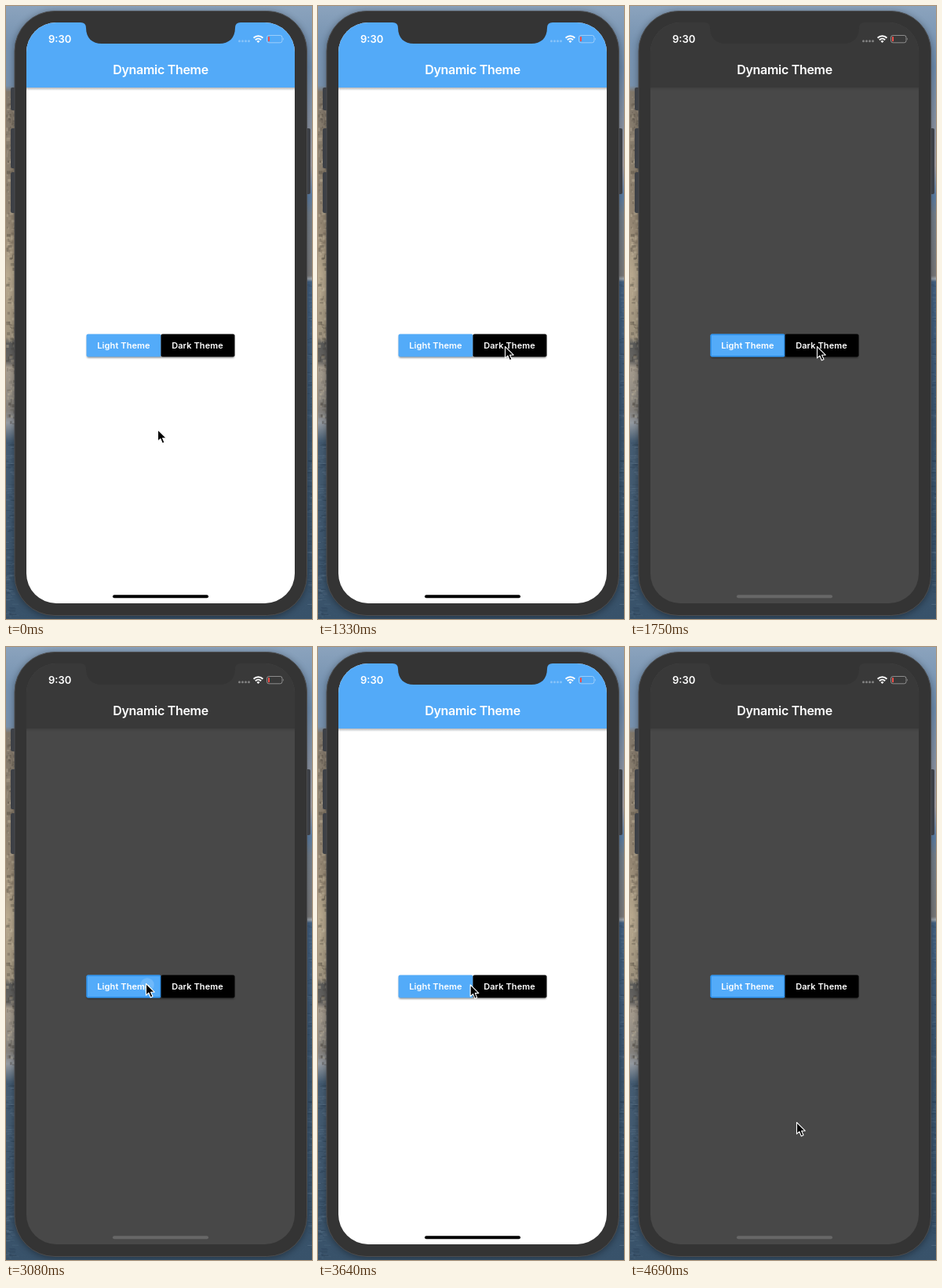
These frames come from a looping animation (390x782 px, 4.76 s). An HTML page:

```html
<!DOCTYPE html>
<html lang="en">
<head>
<meta charset="utf-8">
<title>Dynamic Theme</title>
<style>
  html, body { margin: 0; width: 100%; height: 100%; overflow: hidden; background: #2c4058; }
  svg { display: block; width: 390px; height: 782px; }
  text { font-family: Inter, sans-serif; font-weight: 600; fill: #fff; }
  .label { font-size: 11px; letter-spacing: .1px; text-anchor: middle; }
</style>
</head>
<body>
<svg viewBox="0 0 390 782">
  <defs>
    <linearGradient id="coast" x2="0" y2="1">
      <stop offset="0" stop-color="#8ba3bd"/>
      <stop offset=".06" stop-color="#7793b1"/>
      <stop offset=".13" stop-color="#7791ad"/>
      <stop offset=".14" stop-color="#82786b"/>
      <stop offset=".35" stop-color="#948672"/>
      <stop offset=".44" stop-color="#b9aa90"/>
      <stop offset=".54" stop-color="#a0947f"/>
      <stop offset=".55" stop-color="#5a5a59"/>
      <stop offset=".58" stop-color="#686663"/>
      <stop offset=".59" stop-color="#a89e90"/>
      <stop offset=".66" stop-color="#85827d"/>
      <stop offset=".68" stop-color="#959ba2"/>
      <stop offset=".71" stop-color="#465d73"/>
      <stop offset="1" stop-color="#38526a"/>
    </linearGradient>
    <linearGradient id="sea" x2="0" y2="1">
      <stop offset="0" stop-color="#8ba3bd"/>
      <stop offset=".1" stop-color="#6e8cad"/>
      <stop offset=".26" stop-color="#a09b9f"/>
      <stop offset=".31" stop-color="#5d7fa6"/>
      <stop offset=".34" stop-color="#75808c"/>
      <stop offset=".44" stop-color="#7b7b7c"/>
      <stop offset=".445" stop-color="#a0a8b0"/>
      <stop offset=".45" stop-color="#456384"/>
      <stop offset=".7" stop-color="#3c566f"/>
      <stop offset="1" stop-color="#38526a"/>
    </linearGradient>
    <linearGradient id="drop" x2="0" y2="1">
      <stop stop-opacity=".28"/>
      <stop offset="1" stop-opacity="0"/>
    </linearGradient>
    <filter id="soft" x="-20%" y="-20%" width="140%" height="160%"><feGaussianBlur stdDeviation="1.3"/></filter>
    <filter id="wide"><feGaussianBlur stdDeviation="5"/></filter>
    <clipPath id="screen"><rect x="26" y="21" width="342" height="741" rx="38"/></clipPath>
    <clipPath id="lightClip"><rect x="102.5" y="418.5" width="95" height="29" rx="2"/></clipPath>
    <clipPath id="darkClip"><rect x="197.5" y="418.5" width="94" height="29" rx="2"/></clipPath>
  </defs>

  <rect width="195" height="782" fill="url(#coast)"/>
  <rect x="195" width="195" height="782" fill="url(#sea)"/>
  <g id="texture"></g>
  <rect x="11" y="8" width="372.5" height="771" rx="51" opacity=".4" filter="url(#wide)"/>

  <g fill="#3d4046">
    <rect x="6" y="104" width="8" height="29" rx="2"/>
    <rect x="6" y="156" width="8" height="51" rx="2"/>
    <rect x="6" y="212" width="8" height="52" rx="2"/>
    <rect x="380" y="156" width="8" height="84" rx="2"/>
  </g>
  <rect x="11" y="6.5" width="372.5" height="771" rx="51" fill="#343434" stroke="#4c4d4f"/>

  <g clip-path="url(#screen)">
    <rect id="page" x="26" y="21" width="342" height="741"/>
    <rect id="headerShadow" x="26" y="104" width="342" height="4" fill="url(#drop)"/>
    <rect id="header" x="26" y="21" width="342" height="83"/>
    <path d="M95 20v1q7 0 7 7c0 13 8 20 20 20H272c12 0 20-7 20-20q0-7 7-7v-1z" fill="#343434"/>
    <rect id="homeBar" x="136" y="751.2" width="122" height="4" rx="2"/>
  </g>

  <text x="54" y="46.7" font-size="13">9:30</text>
  <g id="dots" fill="#fff">
    <circle cx="297.5" cy="44.7" r="1.5"/><circle cx="301.5" cy="44.7" r="1.5"/>
    <circle cx="305.5" cy="44.7" r="1.5"/><circle cx="309.5" cy="44.7" r="1.5"/>
  </g>
  <g fill="none" stroke="#fff" stroke-width="2">
    <path d="M315.6 40.7a8.4 8.4 0 0 1 11.8 0M317.9 43.2a5.1 5.1 0 0 1 7.2 0"/>
    <path d="M321.5 47l-2-2.1a2.8 2.8 0 0 1 4 0z" fill="#fff" stroke="none"/>
  </g>
  <rect x="332.5" y="37.5" width="19.5" height="9.3" rx="2.6" fill="none" stroke="#fff" stroke-opacity=".42"/>
  <path d="M353.3 40.5q1.6 1.6 0 3.3z" fill="#fff" fill-opacity=".5"/>
  <rect x="334" y="39" width="2" height="6.3" rx=".8" fill="#f0504a"/>
  <text x="197" y="87" font-size="16" letter-spacing="-.3" text-anchor="middle">Dynamic Theme</text>

  <rect x="103" y="420" width="188" height="29" rx="2" opacity=".4" filter="url(#soft)"/>
  <g clip-path="url(#lightClip)">
    <rect x="102" y="418" width="96" height="30" fill="#53abf9"/>
    <rect id="lightEdge" x="102.5" y="418.5" width="95" height="29" rx="2" fill="none" stroke="#2f92ec" stroke-width="3"/>
    <circle id="lightRipple" cx="180" cy="431" fill="#fff"/>
  </g>
  <g clip-path="url(#darkClip)">
    <rect x="197" y="418" width="95" height="30"/>
    <circle id="darkRipple" cx="242" cy="435" fill="#fff"/>
  </g>
  <text class="label" x="150" y="437">Light Theme</text>
  <text class="label" x="244" y="437">Dark Theme</text>

  <path id="cursor" d="M.5 .5V15.2L3.9 12.2L6.3 18L9 16.8L6.6 11.2H11.2Z"
        stroke="#fff" stroke-width="1.1" stroke-linejoin="round"/>
</svg>

<script>
const LOOP = 4760, STEP = 70;
const $ = id => document.getElementById(id);
const clamp = v => Math.max(0, Math.min(1, v));
const lerp = (a, b, k) => a + (b - a) * k;
const ease = k => k * k * (3 - 2 * k);
const mix = (a, b, k) => `rgb(${a.map((v, i) => Math.round(lerp(v, b[i], k)))})`;

// Cursor stops: time, x, y
const path = [
  [0, 193, 540], [150, 193, 540], [1000, 238, 434], [2000, 238, 434], [2800, 178, 429],
  [3450, 178, 429], [4050, 244, 435], [4480, 244, 435], [4690, 212, 606]
];
// Taps: press time, time the theme starts to change, resulting darkness
const taps = [
  { press: 1390, change: 1540, dark: 1, ripple: 'darkRipple', glow: .31 },
  { press: 3055, change: 3190, dark: 0, ripple: 'lightRipple', glow: .16 },
  { press: 4270, change: 4416, dark: 1, ripple: 'darkRipple', glow: .31 }
];

function cursorAt(t) {
  const i = path.findIndex(p => p[0] > t);
  if (i < 0) return path.at(-1).slice(1);
  const [a, b] = [path[i - 1], path[i]];
  const k = ease((t - a[0]) / (b[0] - a[0]));
  return [lerp(a[1], b[1], k), lerp(a[2], b[2], k)];
}

function paintTexture() {
  let seed = 7, marks = '';
  const random = () => (seed = seed * 16807 % 2147483647) / 2147483647;
  const mark = (x, y, w, h, color) =>
    marks += `<rect x="${x}" y="${y}" width="${w}" height="${h}" fill="${color}" opacity="${.1 + random() * .3}"/>`;
  for (let i = 0; i < 260; i++) {
    const tone = random() < .5 ? '#3d3830' : '#cfc2a8';
    mark(random() * 11, 112 + random() * 420, 1 + random() * 4, 1 + random() * 4, tone);
  }
  for (let i = 0; i < 150; i++) {
    const tone = random() < .5 ? '#22364a' : '#6f879c';
    mark(random() * 11 - 2, 556 + random() * 224, 3 + random() * 6, 1, tone);
    mark(383 + random() * 6, 354 + random() * 426, 3 + random() * 5, 1, tone);
  }
  $('texture').innerHTML = marks;
}

function draw(now) {
  const t = Math.floor(now % LOOP / STEP) * STEP;
  let dark = 0;
  for (const id of ['lightRipple', 'darkRipple']) $(id).setAttribute('opacity', 0);
  for (const tap of taps) {
    if (t < tap.press) break;
    dark = lerp(dark, tap.dark, clamp((t - tap.change) / 200));
    const ripple = $(tap.ripple);
    ripple.setAttribute('r', 70 * clamp((t - tap.press) / 200));
    ripple.setAttribute('opacity', tap.glow * (1 - clamp((t - tap.change - 64) / 140)));
  }
  $('page').setAttribute('fill', mix([255, 255, 255], [72, 72, 72], dark));
  $('header').setAttribute('fill', mix([83, 170, 248], [57, 57, 57], dark));
  $('homeBar').setAttribute('fill', mix([0, 0, 0], [103, 103, 103], dark));
  $('headerShadow').setAttribute('opacity', lerp(1, .4, dark));
  $('lightEdge').setAttribute('opacity', dark);
  $('dots').setAttribute('opacity', lerp(.3, .36, dark));
  $('cursor').setAttribute('transform', `translate(${cursorAt(t)})`);
  requestAnimationFrame(() => draw(performance.now() - start));
}

paintTexture();
const start = performance.now();
draw(0);
</script>
</body>
</html>
```
